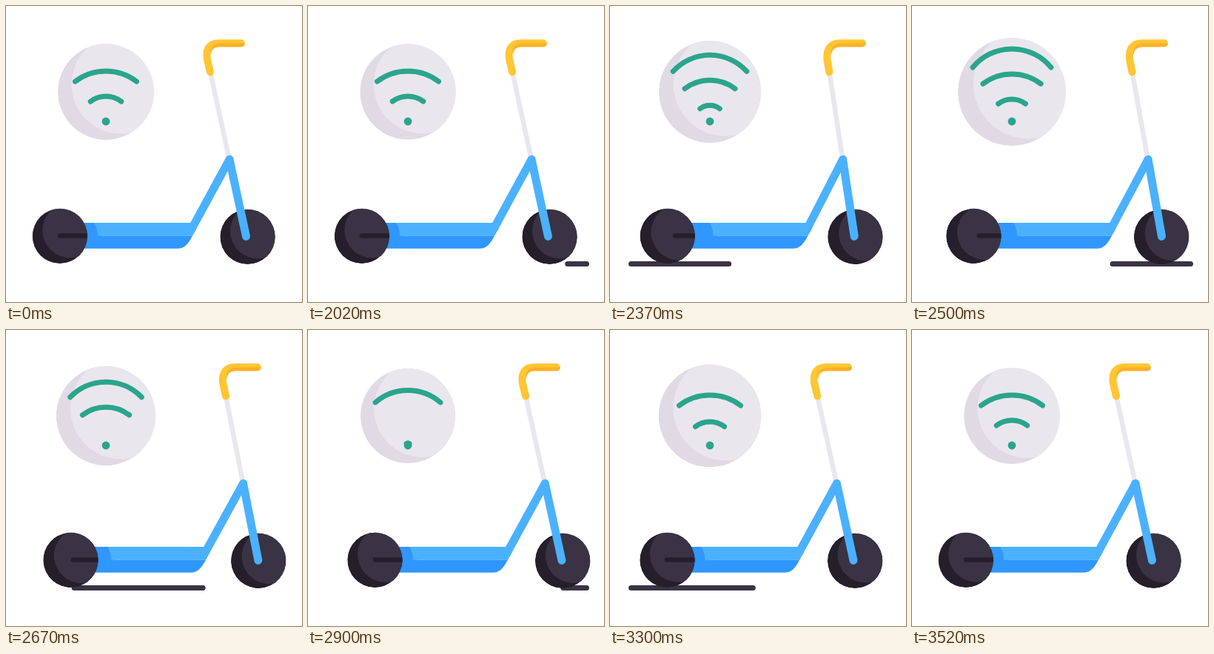
These frames come from a looping animation (400x400 px, 3550 ms). An HTML page:

```html
<!DOCTYPE html>
<html lang="en">
<head>
<meta charset="utf-8">
<title>Scooter</title>
<style>
  html, body { margin: 0; width: 100%; height: 100%; overflow: hidden; background: #fff; }
  svg { display: block; width: 100%; height: 100%; }
  .line { fill: none; stroke-linecap: round; stroke-linejoin: round; }
</style>
</head>
<body>
<svg viewBox="0 0 400 400">
  <defs>
    <clipPath id="tyre"><circle r="37.2"/></clipPath>
    <clipPath id="disc"><circle r="65"/></clipPath>
    <clipPath id="badgeClip"><circle id="badgeEdge" cx="135" cy="116" r="65"/></clipPath>
    <g id="wheel" clip-path="url(#tyre)">
      <circle r="37.2" fill="#251f2c"/>
      <circle cx="14" cy="-8" r="37.5" fill="#393344"/>
    </g>
  </defs>

  <g id="badge">
    <g clip-path="url(#disc)">
      <circle r="65" fill="#e0dae4"/>
      <circle cx="20" cy="-10" r="66.5" fill="#eae6ed"/>
    </g>
  </g>
  <g clip-path="url(#badgeClip)">
    <g id="waves" class="line" stroke="#2aa58c" stroke-width="7"></g>
  </g>
  <circle cx="135" cy="156" r="5.4" fill="#2aa58c"/>

  <g id="road" class="line" stroke="#393344" stroke-width="7"></g>

  <use id="front" href="#wheel"/>
  <path id="tube" class="line" stroke="#4bb1ff" stroke-width="11"/>
  <g id="deck">
    <path fill="#2f97ff" d="M90 293H130V310.5H252C246 322 241 327.7 232 327.7H90Z"/>
    <path fill="#4bb1ff" d="M119 293H249.4L258 300L252 310.7H124Q124 300 119 293Z"/>
  </g>
  <g id="steer">
    <path class="line" stroke="#eae6ed" stroke-width="6.5" d="M276 89L301.5 206"/>
    <path class="line" stroke="#4bb1ff" stroke-width="11" d="M302 207.3L324.5 311.3"/>
    <path class="line" stroke="#ffc533" stroke-width="10" d="M276 89.3L271.8 71.5Q269 50.2 288 50.2H317.8"/>
    <path fill="#ffb027" d="M322.8 50.2Q322.8 55.2 317.8 55.2H288Q277 56 277 67Q274 53 287 50.4Z"/>
  </g>
  <use id="rear" href="#wheel"/>
  <g id="axle" clip-path="url(#tyre)">
    <path id="spoke" class="line" stroke="#251f2c" stroke-width="6.5"/>
  </g>
</svg>

<script>
const LOOP = 3550, START = 2020, END = 3520;
const $ = id => document.getElementById(id);
const set = (el, name, value) => el.setAttribute(name, value);

// Smooth curve through [time, value] pairs, flat at turning points.
function track(...keys) {
  const slope = i => (keys[i + 1][1] - keys[i][1]) / (keys[i + 1][0] - keys[i][0]);
  const tangent = i => {
    if (i === 0 || i === keys.length - 1) return 0;
    const a = slope(i - 1), b = slope(i);
    return a * b <= 0 ? 0 : 2 * a * b / (a + b);
  };
  return t => {
    if (t <= keys[0][0]) return keys[0][1];
    const i = keys.findIndex(k => k[0] > t) - 1;
    if (i < 0) return keys[keys.length - 1][1];
    const [t0, v0] = keys[i], [t1, v1] = keys[i + 1];
    const h = t1 - t0, u = (t - t0) / h, w = 1 - u;
    return v0 * (1 + 2 * u) * w * w + v1 * u * u * (3 - 2 * u)
      + h * u * w * (w * tangent(i) - u * tangent(i + 1));
  };
}

const handle = track([2010, 0], [2250, 23], [2500, 23], [2900, 18], [3120, 10.3], [END, 0]);
const fork = track([2010, 0], [2250, 0.3], [2500, 13], [2900, 18.5], [3120, 10.8], [END, 0]);
const deck = track([2010, 0], [2250, 11], [2500, 18], [2900, 18], [3120, 10.3], [END, 0]);
const wheels = track([2010, 0], [2250, 0.8], [2500, 10.5], [2900, 17.6], [3120, 10.8], [END, 0]);
const roll = track([2010, 0], [2250, 12], [2500, 11], [2900, 2], [3120, 0], [END, 0]);
const radius = track([1990, 65], [2170, 62], [2510, 73], [2820, 62], [3110, 73], [END, 65]);
const spread = track([2005, 0], [2250, 15], [2500, 30], [2900, 74.5], [3120, 68]);
const sprout = track([2870, 0], [2900, 3], [3120, 26], [3450, 34]);

// Road streaks: [start, mid, end] of each pass.
const passes = [[1996, 2250, 2495], [2400, 2650, 2885], [2863, 3176, 3515]];

const newPath = parent =>
  parent.appendChild(document.createElementNS('http://www.w3.org/2000/svg', 'path'));
const waves = [0, 1, 2, 3].map(() => newPath($('waves')));
const streaks = passes.map(() => newPath($('road')));

// Signal arc whose crown is d above the dot.
function wavePath(d) {
  if (d < 1) return '';
  const base = Math.min(d, 68), extra = d - base;
  const half = 0.61 * base + 0.38 * extra;
  const sag = 0.206 * base + 0.37 * extra;
  const r = (half * half + sag * sag) / (2 * sag);
  return `M${135 - half} ${156 - d + sag}A${r} ${r} 0 0 1 ${135 + half} ${156 - d + sag}`;
}

function streakPath(t, [a, m, b]) {
  if (t <= a || t >= b) return '';
  const p = t < m ? 0.5 * (t - a) / (m - a) : 0.5 + 0.5 * (t - m) / (b - m);
  const head = 376.5 - 522 * p;
  return `M${Math.max(28.5, head)} 348.5H${Math.min(376.5, head + 174)}`;
}

function draw(time) {
  const t = time < START || time >= END ? 0 : time;

  const r = radius(t);
  set($('badge'), 'transform', `translate(135 116) scale(${r / 65})`);
  set($('badgeEdge'), 'r', r);
  const s = spread(t), old = t < 2820;
  [old ? s + 68 : 0, old ? s + 34 : 0, s, sprout(t)]
    .forEach((d, i) => set(waves[i], 'd', wavePath(d)));

  streaks.forEach((el, i) => set(el, 'd', t ? streakPath(t, passes[i]) : ''));

  const f = fork(t), lean = (handle(t) - f) / 261;
  set($('steer'), 'transform', `matrix(1 0 ${-lean} 1 ${f + 311 * lean} 0)`);

  const d = deck(t);
  set($('deck'), 'transform', `translate(${d} 0)`);
  set($('tube'), 'd', `M${251 + d} 301L${302 + f + 104 * lean} 207.3`);

  const w = wheels(t), turn = roll(t);
  set($('rear'), 'transform', `translate(${72.8 + w} 310.9) rotate(${turn})`);
  set($('front'), 'transform', `translate(${326.5 + w} 311.9) rotate(${turn})`);
  set($('axle'), 'transform', `translate(${72.8 + w} 310.9)`);
  set($('spoke'), 'd', `M${d - w} -0.4H50`);
}

function tick() {
  draw(performance.now() % LOOP);
  requestAnimationFrame(tick);
}
tick();
</script>
</body>
</html>
```
